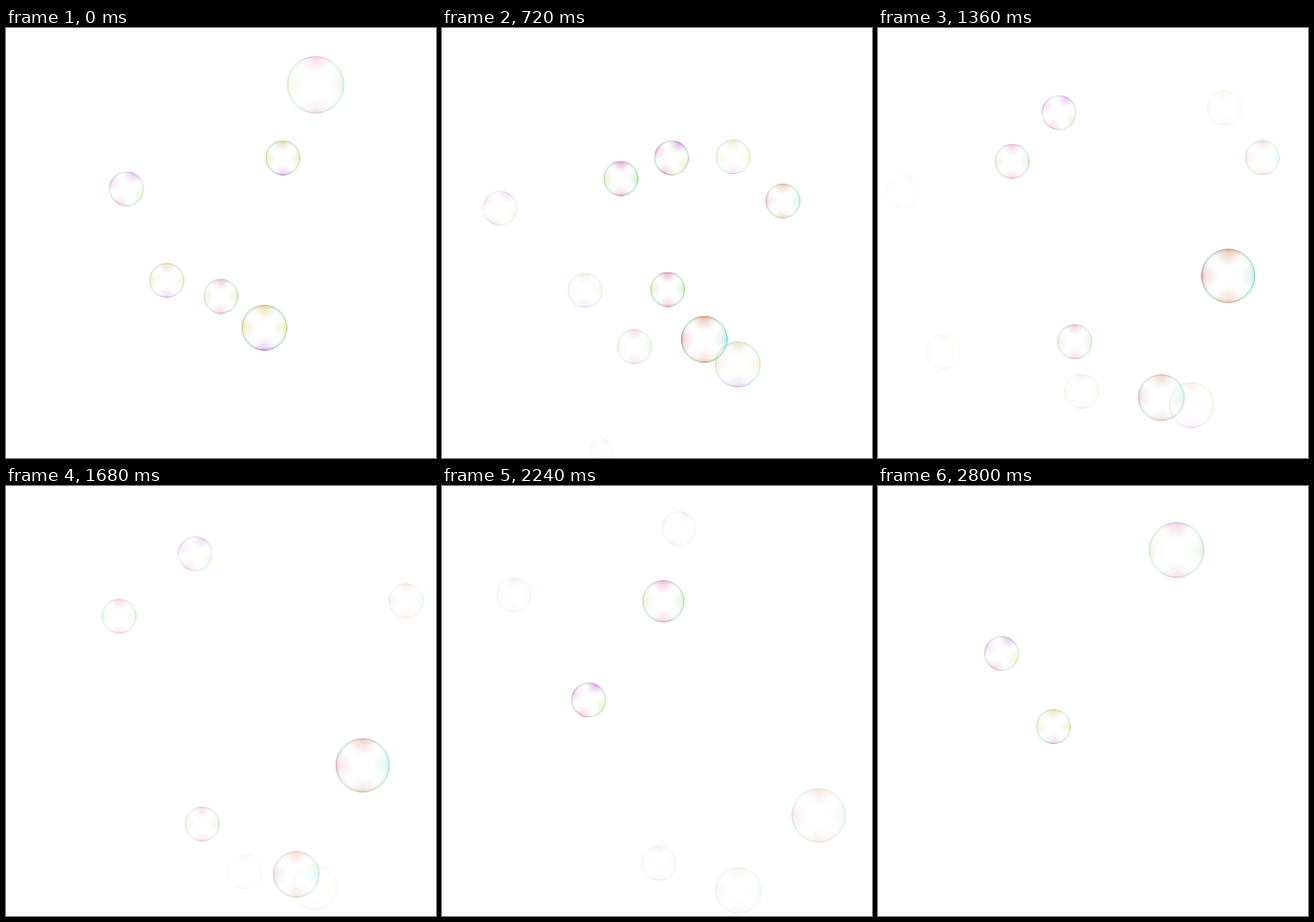
Recreate the animation shown at these times as an HTML page with a canvas. Size 500 by 500 pixels, loop 2880 ms.

```html
<!DOCTYPE html>
<html lang="en">
<head>
<meta charset="utf-8">
<title>Soap bubbles</title>
<style>
html, body { margin: 0; width: 100%; height: 100%; overflow: hidden; background: #fff; }
canvas { display: block; width: 500px; height: 500px; }
</style>
</head>
<body>
<canvas id="stage" width="500" height="500"></canvas>
<script>
const LOOP = 2880, STEP = 80, R = 80;
const ctx = document.getElementById('stage').getContext('2d');
ctx.imageSmoothingQuality = 'high';

const mix = (a, b, u) => a + (b - a) * u;
const tint = (hue, a) => `hsla(${hue}, 52%, 58%, ${a})`;

// A film: four hues clockwise from the top, turned by an angle.
function makeFilm(hues, turn = 0) {
  const c = document.createElement('canvas');
  c.width = c.height = 2 * R;
  const g = c.getContext('2d');
  g.translate(R, R);
  g.rotate(turn - Math.PI / 2);
  g.beginPath();
  g.arc(0, 0, R - 1, 0, 2 * Math.PI);
  g.clip();

  const rim = g.createConicGradient(0, 0, 0);
  hues.forEach((hue, i) => {
    rim.addColorStop(i / 4, tint(hue, 1));
    rim.addColorStop((i + 0.5) / 4, tint(150, 0.65));

    // Soft smudge against the rim, strongest at the top.
    const x = 0.9 * R * Math.cos(i * Math.PI / 2), y = 0.9 * R * Math.sin(i * Math.PI / 2);
    const smudge = g.createRadialGradient(x, y, 0, x, y, 0.55 * R);
    smudge.addColorStop(0, tint(hue, i ? 0.24 : 0.42));
    smudge.addColorStop(1, tint(hue, 0));
    g.fillStyle = smudge;
    g.fillRect(-R, -R, 2 * R, 2 * R);
  });
  rim.addColorStop(1, tint(hues[0], 1));

  g.strokeStyle = rim;
  for (const [width, alpha] of [[22, 0.12], [9, 0.65]]) {
    g.lineWidth = width;
    g.globalAlpha = alpha;
    g.stroke();
  }
  return c;
}

const pink = makeFilm([325, 110, 335, 80]);
const violet = makeFilm([290, 70, 330, 310], 0.45);
const gold = makeFilm([45, 60, 285, 52]);
const peach = makeFilm([15, 182, 20, 345]);

const bubbles = [];
// The path holds points at equal time steps between start and end.
function bubble(film, start, end, path, look = {}) {
  bubbles.push({ film, start, end, path, r: 20.5, grow: 0, from: 1, to: 0, ...look });
}

bubble(pink, 0, 720, [[360, 66], [391, 75], [420, 93]], { r: 34, grow: 1.5, from: 0.45 });
bubble(violet, 0, 1520, [[140, 187], [64.5, 209.5], [23, 179]], { from: 0.7 });
bubble(gold, 0, 1600, [[187, 293.5], [176, 298.5], [131, 332], [8, 432]], { from: 0.75 });
bubble(gold, 0, 1680, [[322, 151], [332, 153], [370, 125], [469, 25]]);
bubble(pink, 0, 1920, [[250, 312], [226, 364], [231, 416], [330, 468]], { from: 0.75 });
bubble(gold, 0, 1760 + 160, [[300.5, 348.5], [339.5, 386], [364, 432], [345, 490]], { r: 27 });
bubble(peach, 320, 2240, [[369, 229], [416, 181.5], [461.5, 137], [467, 135]]);
bubble(violet, 320, 800, [[160, 373], [190, 514]], { r: 13 });
bubble(violet, 720, 2640, [[267, 151], [210.5, 98.5], [247, 61.5], [331, 30]]);
bubble(pink, 720, 2640, [[208, 175], [156, 155], [105.5, 142], [40, 76]]);
bubble(pink, 720, 2640, [[262.5, 304], [228, 393], [289, 468.5]]);
bubble(peach, 720, 2640, [[305, 362], [337.5, 451.5], [344.5, 468.5]], { r: 27.5 });
bubble(peach, 1200, 2800, [[405, 269], [426.5, 359], [473.5, 434]], { r: 32 });
bubble(pink, 1760, LOOP, [[180.5, 185], [360, 66]], { r: 18, grow: 16, to: 0.45 });
bubble(violet, 1840, LOOP, [[189.5, 287.5], [140, 187]], { to: 0.7 });
bubble(gold, 2320, LOOP, [[249, 242.5], [196.5, 286]], { to: 0.75 });

// Lagrange curve through evenly spaced points, u from 0 to 1.
function along(path, u) {
  const s = u * (path.length - 1);
  let x = 0, y = 0;
  path.forEach((p, i) => {
    let w = 1;
    path.forEach((_, j) => { if (j !== i) w *= (s - j) / (i - j); });
    x += w * p[0];
    y += w * p[1];
  });
  return [x, y];
}

function render() {
  const now = performance.now() % LOOP;
  const t = Math.floor((now - begin % LOOP + LOOP) % LOOP / STEP) * STEP;
  ctx.clearRect(0, 0, 500, 500);
  for (const b of bubbles) {
    if (t < b.start || t >= b.end) continue;
    const u = (t - b.start) / (b.end - b.start);
    const [x, y] = along(b.path, u);
    const r = b.r + b.grow * u;
    ctx.globalAlpha = mix(b.from, b.to, u);
    ctx.drawImage(b.film, x - r, y - r, 2 * r, 2 * r);
  }
  requestAnimationFrame(render);
}

const begin = performance.now();
render();
</script>
</body>
</html>
```
